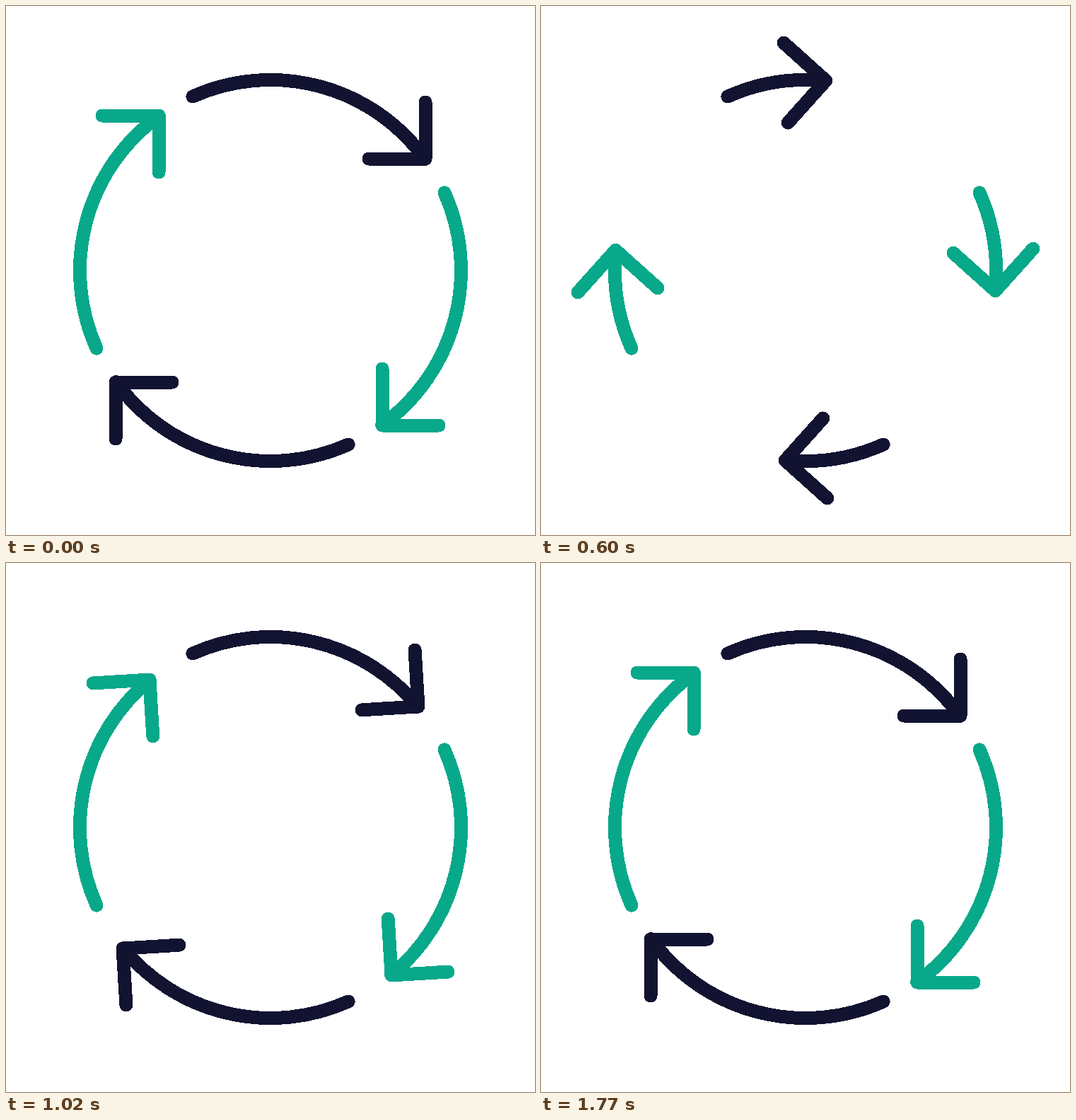
Animation of 748 by 748 pixels, one loop 3.83 s. Source, as an HTML page:

```html
<!DOCTYPE html>
<html lang="en">
<head>
<meta charset="utf-8">
<title>Circling arrows</title>
<style>
  html, body { margin: 0; width: 100%; height: 100%; overflow: hidden; background: #fff; }
  svg { display: block; width: 100%; height: 100%; }
</style>
</head>
<body>
<svg viewBox="0 0 748 748" fill="none" stroke-width="19" stroke-linecap="round"
     stroke-linejoin="round" shape-rendering="crispEdges"></svg>
<script>
const NS = 'http://www.w3.org/2000/svg';
const LOOP = 3830, STEP = 30, END = 1770;
const RADIUS = 269.5, TAIL = -24.1, TIP = 54.2, ARM = 80;
const COLORS = ['#121331', '#08a88a'];

// Head swing around the centre: [ms, degrees]
const KEYS = [[0, 0], [360, -45.2], [475, -53.5], [600, -48.1], [840, -14.1],
              [1020, -3.5], [1260, 3.65], [1500, 14.5], [END, 0]];

const slope = i => (KEYS[i + 1][1] - KEYS[i][1]) / (KEYS[i + 1][0] - KEYS[i][0]);

// Smooth tangent that never overshoots a key
function tangent(i) {
  if (i === 0 || i === KEYS.length - 1) return 0;
  const a = slope(i - 1), b = slope(i);
  return a * b > 0 ? 2 * a * b / (a + b) : 0;
}

function swing(t) {
  if (t >= END) return 0;
  const i = KEYS.findIndex((k, n) => t < KEYS[n + 1][0]);
  const [t0, v0] = KEYS[i], [t1, v1] = KEYS[i + 1];
  const d = t1 - t0, u = (t - t0) / d, w = 1 - u;
  return v0 * w * w * (1 + 2 * u) + v1 * u * u * (3 - 2 * u)
       + d * u * w * (w * tangent(i) - u * tangent(i + 1));
}

function polar(deg) {
  const a = deg * Math.PI / 180;
  return `${RADIUS * Math.sin(a)} ${-RADIUS * Math.cos(a)}`;
}

function add(parent, name, attrs) {
  const el = document.createElementNS(NS, name);
  for (const key in attrs) el.setAttribute(key, attrs[key]);
  return parent.appendChild(el);
}

const svg = document.querySelector('svg');
const arrows = [0, 1, 2, 3].map(i => {
  const g = add(svg, 'g', {
    transform: `translate(374 374) rotate(${i * 90})`,
    stroke: COLORS[i % 2]
  });
  return {
    arc: add(g, 'path', {}),
    head: add(g, 'path', { d: `M219 ${-158 - ARM}v${ARM}h${-ARM}` })
  };
});

function draw(ms) {
  const t = Math.floor((ms % LOOP) / STEP) * STEP;
  const turn = swing(t);
  const d = `M${polar(TAIL)}A${RADIUS} ${RADIUS} 0 0 1 ${polar(TIP + turn)}`;
  for (const { arc, head } of arrows) {
    arc.setAttribute('d', d);
    head.setAttribute('transform', `rotate(${turn})`);
  }
}

let start;
function tick(now) {
  start ??= now;
  draw(now - start);
  requestAnimationFrame(tick);
}
draw(0);
requestAnimationFrame(tick);
</script>
</body>
</html>
```
